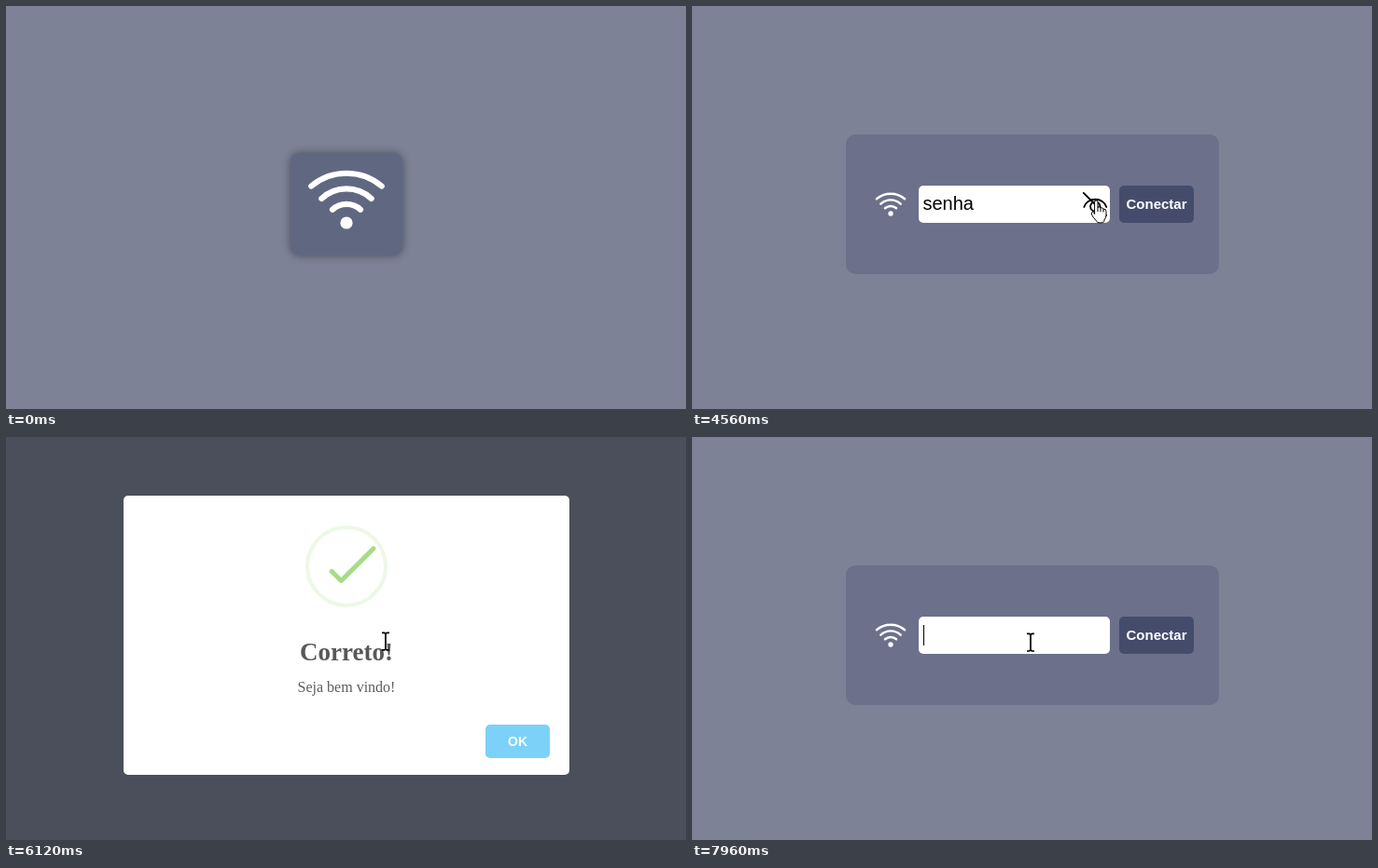
Animation of 729 by 433 pixels, one loop 8000 ms. Source, as an HTML page:

```html
<!DOCTYPE html>
<html lang="pt">
<head>
<meta charset="utf-8">
<title>Wi-Fi</title>
<style>
html, body { margin: 0; width: 100%; height: 100%; overflow: hidden; background: #7d8297; }
svg { display: block; width: 729px; height: 433px; }
.sans { font-family: "Liberation Sans", Arial, sans-serif; }
.serif { font-family: "Liberation Serif", "Times New Roman", serif; fill: #000; text-anchor: middle; }
.line { fill: none; stroke: #000; }
</style>
</head>
<body>
<svg viewBox="0 0 729 433">
  <defs>
    <filter id="soft" x="-30%" y="-30%" width="160%" height="160%"><feGaussianBlur id="blur" stdDeviation="5"/></filter>
  </defs>
  <rect width="729" height="433" fill="#7d8297"/>
  <rect id="shadow" rx="10" filter="url(#soft)"/>
  <rect id="card" rx="10"/>
  <g id="wifi" fill="none" stroke="#fff" stroke-width="6.2" stroke-linecap="round">
    <path d="M-37.7-19.5A58.6 58.6 0 0 1 37.7-19.5M-26.7-6A39 39 0 0 1 26.7-6M-15 5.7A22 22 0 0 1 15 5.7"/>
    <circle cy="20" r="6.6" fill="#fff" stroke="none"/>
  </g>
  <g id="form" class="sans">
    <rect x="243" y="193" width="205" height="40" rx="5" fill="#fff"/>
    <rect x="458" y="193" width="80" height="40" rx="5" fill="#454c6b"/>
    <text x="498" y="218" font-size="15" font-weight="700" fill="#fff" text-anchor="middle">Conectar</text>
    <text id="field" x="247.5" y="219" font-size="20" fill="#000"></text>
    <rect id="caret" y="202" width="1" height="22"/>
    <g id="eye" class="line" stroke-width="1.8" stroke-linecap="round">
      <path d="M420.3 216A12.4 11 0 0 1 444.3 216"/>
      <circle cx="432.3" cy="215.5" r="5.2"/>
      <path id="slash" d="M419.8 200.8L444 225"/>
    </g>
  </g>
  <g id="overlay">
    <rect width="729" height="433" opacity=".4"/>
    <g id="modal">
      <rect x="126" y="63" width="478" height="300" rx="5" fill="#fff"/>
      <circle cx="365" cy="139" r="42" fill="none" stroke="#a5dc86" stroke-opacity=".2" stroke-width="4"/>
      <rect id="tip" height="5" rx="2" fill="#a5dc86"/>
      <rect id="long" height="5" rx="2" fill="#a5dc86"/>
      <text class="serif" x="365" y="240" font-size="27" font-weight="700" opacity=".65">Correto!</text>
      <text class="serif" x="365" y="274" font-size="16" opacity=".64">Seja bem vindo!</text>
      <rect id="ring" x="512" y="307" width="73" height="40" rx="6.5" fill="none" stroke="#2b72a5" stroke-opacity=".29" stroke-width="2"/>
      <rect id="ok" x="514" y="309" width="69" height="36" rx="5"/>
      <text class="sans" x="548.5" y="332" font-size="14" font-weight="700" fill="#fff" text-anchor="middle">OK</text>
    </g>
  </g>
  <g id="pointer">
    <path id="arrow" d="M.5 .7V16.6L4.1 13.2L6.7 18.8L9 17.8L6.6 12.2H11.7Z" fill="#fff" stroke="#000"/>
    <g id="hand" transform="translate(-5.7 -.5)" fill="#fff" stroke="#000">
      <path d="M4 15V2.2Q4 .5 5.7 .5Q7.4 .5 7.4 2.2V8Q9 6.6 10.4 8.4Q12.2 7.6 13.4 9.6Q16.4 9.2 16.4 12V16Q16.4 19 14.3 21.5V23Q13.5 24.5 10 24.5Q6.5 24.5 6 22.5Q2 18.5 1 15.8Q0 13 1.8 12.8Q3 12.8 4 15Z"/>
      <path d="M7.4 8V12.5M10.4 8.4V12.7M13.4 9.6V13" fill="none"/>
    </g>
    <path id="beam" class="line" stroke-width="1.7" d="M-4-9.3H-1.4L0-8.2L1.4-9.3H4M0-8.5V8.5M-4 9.3H-1.4L0 8.2L1.4 9.3H4"/>
    <circle id="press" r="12.3" fill="#e8e600" opacity=".55"/>
  </g>
</svg>
<script>
const LOOP = 8000, STEP = 40;
const el = Object.fromEntries([...document.querySelectorAll('[id]')].map(n => [n.id, n]));

const set = (node, attrs) => { for (const k in attrs) node.setAttribute(k, attrs[k]); };
const show = (node, on) => node.setAttribute('visibility', on ? 'inherit' : 'hidden');
const clamp = v => Math.min(1, Math.max(0, v));
const span = (t, from, length) => clamp((t - from) / length);
const mix = (a, b, p) => a + (b - a) * p;
const during = (t, from, to) => t >= from && t < to;
const inside = (p, x, y, w, h) => p.x >= x && p.x <= x + w && p.y >= y && p.y <= y + h;
const smooth = p => p * p * (3 - 2 * p);

// CSS "ease": cubic-bezier(.25, .1, .25, 1)
function ease(x) {
  const curve = (a, b, s) => 3 * a * s * (1 - s) ** 2 + 3 * b * s * s * (1 - s) + s ** 3;
  let lo = 0, hi = 1;
  for (let i = 0; i < 20; i++) {
    const mid = (lo + hi) / 2;
    if (curve(.25, .25, mid) < x) lo = mid; else hi = mid;
  }
  return x <= 0 ? 0 : x >= 1 ? 1 : curve(.1, 1, lo);
}

// Stops are [progress, ...values], eased from one to the next.
function keyed(p, stops) {
  if (p <= stops[0][0]) return stops[0].slice(1);
  for (let i = 1; i < stops.length; i++) {
    const a = stops[i - 1], b = stops[i];
    if (p <= b[0]) {
      const e = ease((p - a[0]) / (b[0] - a[0]));
      return a.slice(1).map((v, k) => mix(v, b[k + 1], e));
    }
  }
  return stops.at(-1).slice(1);
}

// Pointer moves: start, end, target x, target y
const start = { x: 617, y: 430 };
const moves = [
  [480, 1320, 376.3, 213],
  [3980, 4320, 433.3, 209],
  [4930, 5240, 494, 209],
  [5840, 6320, 354.5, 226],
  [6330, 7040, 546, 315],
  [7340, 7800, 363, 220.7]
];
const presses = [[1600, 1680], [2400, 2440], [4480, 4560], [5320, 5360], [7160, 7240]  , [7920, 7960]];

function pointerAt(t) {
  let { x, y } = start;
  for (const [from, to, tx, ty] of moves) {
    const p = smooth(span(t, from, to - from));
    x = mix(x, tx, p);
    y = mix(y, ty, p);
  }
  return { x, y };
}

function pointerKind(t, p) {
  if (during(t, 5520, 7240)) {
    if (inside(p, 514, 309, 69, 36)) return 'hand';
    return inside(p, 315, 216, 99, 30) ? 'beam' : 'arrow';
  }
  if (t < 1840) return inside(p, 305, 158, 120, 110) ? 'hand' : 'arrow';
  const eye = during(t, 3040, 5320) && inside(p, 419, 199, 26, 28);
  if (eye || inside(p, 458, 193, 80, 40)) return 'hand';
  return inside(p, 243, 193, 205, 40) ? 'beam' : 'arrow';
}

function drawCard(t) {
  const hover = ease(span(t, 1140, 300));
  const open = ease(span(t, 1640, 600));
  const scale = mix(1, 1.05, hover);
  const w = mix(120.5 * scale, 400, open), h = mix(110.5 * scale, 150, open);
  const box = { x: 365 - w / 2, y: 213 - h / 2, width: w, height: h };
  const fill = [[96, 108], [104, 112], [129, 138]].map(([a, b]) => Math.round(mix(a, b, open)));
  set(el.card, { ...box, fill: `rgb(${fill})` });
  set(el.shadow, { ...box, opacity: mix(.38, .48, hover) * (1 - open) });
  set(el.blur, { stdDeviation: mix(5, 7, hover) });
  const size = mix(scale, .4, open);
  set(el.wifi, { transform: `translate(${mix(365, 213, open)} ${mix(213, 215, open)}) scale(${size})` });
  set(el.form, { opacity: span(open, .5, .5) });
}

function drawField(t) {
  const dots = [3040, 3200, 3240, 3400, 3440].filter(at => t >= at).length;
  const filled = during(t, 3040, 5320), plain = t >= 4480;
  el.field.textContent = !filled ? '' : plain ? 'senha' : '•'.repeat(dots);
  show(el.eye, filled);
  show(el.slash, filled && plain);
  show(el.caret, during(t, 2400, 2920) || during(t, 3040, 4000) || during(t, 5320, 5840) || t >= 7920);
  set(el.caret, { x: 248 + (filled ? dots * 7 : 0) });
}

function drawModal(t, p) {
  const from = 5472;
  const shown = during(t, 5520, 7560);
  show(el.overlay, shown);
  if (!shown) return;
  set(el.overlay, { opacity: ease(span(t, from, 300)) * (1 - ease(span(t, 7210, 300))) });
  const [scale] = keyed(span(t, from, 300), [[.01, .5], [.45, 1.05], [.8, .95], [1, 1]]);
  set(el.modal, { transform: `translate(365 213) scale(${scale}) translate(-365 -213)` });

  const tick = span(t, from, 750);
  const [tw, left, ttop] = keyed(tick, [[.54, 0, 1, 19], [.7, 50, -8, 37], [.84, 17, 21, 48], [1, 25, 14, 46]]);
  const [lw, right, ltop] = keyed(tick, [[.65, 0, 46, 54], [.84, 55, 0, 35], [1, 47, 8, 38]]);
  drawStroke(el.tip, 325 + left, 99 + ttop, tw, 45);
  drawStroke(el.long, 405 - right - lw, 99 + ltop, lw, -45);

  show(el.ring, t >= 7160);
  set(el.ok, { fill: inside(p, 514, 309, 69, 36) ? '#78cbf2' : '#7cd1f9' });
}

function drawStroke(node, x, y, width, angle) {
  set(node, { x, y, width, transform: `rotate(${angle} ${x + width / 2} ${y + 2.5})` });
}

function drawPointer(t, p) {
  show(el.pointer, t >= 520 && !during(t, 3040, 4000));
  set(el.pointer, { transform: `translate(${p.x} ${p.y})` });
  const kind = pointerKind(t, p);
  for (const name of ['arrow', 'hand', 'beam']) show(el[name], name === kind);
  show(el.press, presses.some(([a, b]) => during(t, a, b)));
}

function draw(time) {
  const t = Math.floor((time % LOOP) / STEP) * STEP;
  const p = pointerAt(t);
  drawCard(t);
  drawField(t);
  drawModal(t, p);
  drawPointer(t, p);
}

const begin = performance.now();
function tick() {
  draw(Math.max(0, performance.now() - begin));
  requestAnimationFrame(tick);
}
tick();
</script>
</body>
</html>
```
